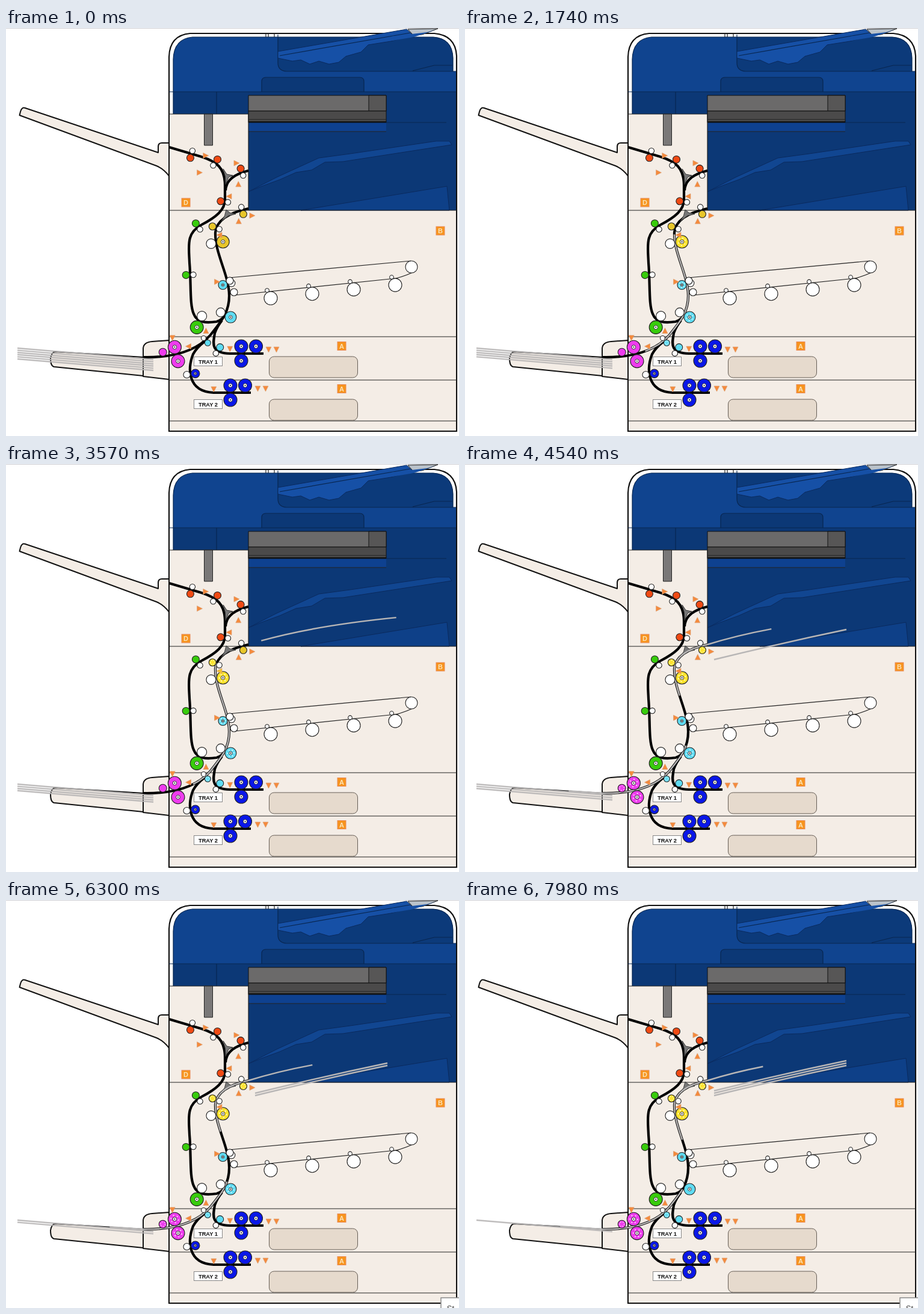
Recreate the animation shown at these times as an HTML page. Size 753 px wide and 678 px high, loop 8000 ms.

```html
<!DOCTYPE html>
<html lang="en">
<head>
<meta charset="utf-8">
<title>Paper path</title>
<style>
html, body { margin: 0; width: 100%; height: 100%; overflow: hidden; background: #fff; }
svg { display: block; width: 753px; height: 678px; }
text { font-family: "Liberation Sans", Arial, sans-serif; font-weight: bold; text-anchor: middle; }
.body { fill: #f4ede6; stroke: #111; stroke-width: 2; stroke-linejoin: round; }
.line { fill: none; stroke: #222; stroke-width: 1.2; }
.seam { fill: none; stroke: #082650; stroke-width: 1.2; }
.track { fill: none; stroke: #000; stroke-width: 4.2; }
.gate { fill: #777; stroke: #333; }
.handle { fill: #e6dacd; stroke: #665e56; }
.sheet { fill: none; stroke: #b8b6b6; stroke-width: 2.4; }
.arrow { fill: #f58a3c; stroke: #d8a27a; stroke-width: .7; }
</style>
</head>
<body>
<svg viewBox="0 0 753 678">
  <path d="M0 .5H753" stroke="#cfcfd4"/>

  <!-- cabinet -->
  <path fill="#fff" stroke="#111" stroke-width="2.2" d="M271 670V48Q272 12 306 9H712Q747 12 749 46V670Z"/>
  <path fill="#f4ede6" d="M272 143H748V669H272Z"/>
  <path class="line" d="M432 9v6M436 9v6M446 9v6"/>
  <path fill="#10448f" d="M278 143V52Q279 18 310 15H710Q742 17 743 50V72H748V303H403V143Z"/>
  <path fill="#0c3876" d="M278 106H748V303H403V143H278Z"/>
  <path id="hood" fill="#0c3a7a" d="M452 15H710Q742 17 743 50V72H466Q452 71 452 58Z"/>
  <path fill="#0c3876" d="M425 106V89Q425 82 432 82H588Q595 82 595 89V106Z"/>
  <path class="seam" d="M278 143V52Q279 18 310 15H710Q742 17 743 50V72M452 11V58Q452 71 466 72H748M425 106V89Q425 82 432 82H588Q595 82 595 89V106M271 106H748M350 106V143M632 157H732M676 71L712 62H742"/>
  <path fill="#1650a6" stroke="#0a2a5e" d="M452 39L666 2L677 12L640 22L602 28L590 40L565 47L553 57L537 60L520 55L505 60L490 53L476 55L452 50Z"/>
  <path class="seam" d="M455 46L672 8"/>
  <path fill="#bac2ca" stroke="#222" d="M668 2L718 1L692 11L677 12Z"/>
  <path fill="#1650a6" d="M640 14L700 7L715 3L678 15L642 21Z"/>

  <!-- output bay -->
  <path fill="#0e4190" d="M403 157H632V172H403Z"/>
  <path fill="#6b6a6a" stroke="#111" d="M403 112H632V138H403Z"/>
  <path fill="#575656" stroke="#111" d="M603 112H632V138H603Z"/>
  <path fill="#4b4a4a" stroke="#111" d="M403 138H632V157H403Z"/>
  <path stroke="#111" stroke-width="2" d="M403 156H632"/>
  <path stroke="#222" d="M403 152H632M403 172H632"/>
  <path fill="#114691" stroke="#0a2a5e" d="M403 272L450 248L520 216L572 209L715 188H737L741 194L560 222L530 223L508 236L482 240L455 252L425 263Z"/>
  <path fill="#0e4088" stroke="#0a2a5e" d="M490 303L733 263L737 303Z"/>
  <path class="line" d="M271 143H403V303M271 303H749M271 513H749M271 585H749M271 653H749"/>
  <path fill="#7a7878" stroke="#222" d="M329.500 143H343.500V195H329.500Z"/>

  <!-- side trays -->
  <path class="body" d="M271 191H259Q253 191 253 197V207L32 133Q26 131 24 139L22.500 145L250 229Q262 234 271 246Z"/>
  <path class="body" d="M228 547L82 538Q76 538 74 549Q74 562 80 563L228 578Z"/>
  <path class="body" d="M271 519L243 521Q229 522 228 532V579L271 584Z"/>

  <!-- belt -->
  <path class="line" d="M371 415L673 387M380 444L648 416Q665 412 682 403"/>

  <!-- paper tracks -->
  <path id="duplex" class="track" d="M271 198L325 214C350 222 364 232 364 262V285C364 302 350 314 325 327C299 341 304 362 305 390C308 425 305 460 312 475C318 491 335 490 350 488Q361 485 365 474"/>
  <path id="upper" class="track" d="M403 237C380 243 366 252 365 270"/>
  <path id="tray1" class="track" d="M428 541H372C338 540 345 522 347 507Q351 496 359 486"/>
  <path id="tray2" class="track" d="M407 606H345C301 604 302 565 311 542Q317 531 330 521"/>
  <path class="track" d="M228 547C275 548 316 538 340 510C355 490 371 475 371 445C371 410 347 375 348 340C350 318 375 306 403 300"/>
  <path id="route" fill="none" d="M20 533L228 547C275 548 316 538 340 510C355 490 371 475 371 445C371 410 347 375 348 340C350 318 375 306 403 300C480 276 560 264 650 255"/>
  <path class="gate" d="M361 234L367 243L377 245L370 248L365 260Q366 246 361 234Z"/>
  <path class="gate" d="M366 302L372 307L382 309L370 312L358 321Q365 312 366 302Z"/>

  <g id="sheets"></g>
  <g id="parts"></g>
  <g id="tip">
    <rect x="723" y="661" width="40" height="30" fill="#fff" stroke="#8a8a8a" stroke-width="1.5"/>
    <text x="739" y="683" font-size="13" fill="#444" style="font-weight:normal">St</text>
  </g>
</svg>
<script>
const LOOP = 8000, PERIOD = 1760, SPEED = 0.178;
const SHEET = 228, EXIT_TIME = 3580, FALL_TIME = 800, STACK = 6;
const RED = '#f04a14', GREEN = '#38cc0c', YELLOW = '#e8c62a', BRIGHT_YELLOW = '#ffe32c';
const CYAN = '#5fdcf3', MAGENTA = '#ee3cee', BLUE = '#0a17e8', WHITE = '#fff';
const ANGLES = { '>': 0, 'v': 90, '<': 180, '^': -90 };

const $ = id => document.getElementById(id);
const route = $('route'), routeD = route.getAttribute('d'), routeEnd = route.getTotalLength();
const mix = (a, b, p) => a + (b - a) * p;
const parts = [];

// Point next to a track; positive offsets lie to the right of travel
function beside(track, distance, offset) {
  const a = $(track).getPointAtLength(distance), b = $(track).getPointAtLength(distance + 1);
  const length = Math.hypot(b.x - a.x, b.y - a.y);
  return [a.x - (b.y - a.y) / length * offset, a.y + (b.x - a.x) / length * offset];
}

function roller(x, y, r, color = WHITE, at = 0) {
  const ring = at && `<circle class="ring" r="${r * 0.58}" fill="none" stroke="#fff" stroke-width="1.3"
    stroke-dasharray="${r * 0.2} ${r * 0.407}"/>`;
  const hub = r > 7 && color !== WHITE && `<circle r="${r * 0.3}" fill="#fff" stroke="#333"/><circle r="1"/>`;
  parts.push(`<g transform="translate(${x} ${y})" ${at ? `data-at="${at}"` : ''}>
    <circle class="disc" r="${r}" fill="${color}" stroke="#222" stroke-width="1.1"/>${ring || ''}${hub || ''}</g>`);
}

// A driven roller and its smaller idler pinching a track
function nip(track, distance, color, r, side = 1) {
  const idler = Math.min(r * 0.78, 8);
  roller(...beside(track, distance, -side * (idler + 0.5)), idler);
  roller(...beside(track, distance, side * (r + 1)), r, color, track === 'route' ? distance : 0);
}

function arrow(x, y, direction, id = '') {
  parts.push(`<path id="${id}" class="arrow" d="M-4 -4.500L5 0L-4 4.500Z"
    transform="translate(${x} ${y}) rotate(${ANGLES[direction]})"/>`);
}
const sensor = (track, distance, offset, direction, id) =>
  arrow(...beside(track, distance, offset), direction, id);

function label(text, x, y, size, color) {
  parts.push(`<text x="${x}" y="${y}" font-size="${size}" fill="${color}">${text}</text>`);
}
function badge(letter, x, y) {
  parts.push(`<rect x="${x - 7}" y="${y - 7}" width="14" height="14" fill="#f7941d" stroke="#e88a5a"/>`);
  label(letter, x, y + 4, 11, '#fbe3b8');
}

function paperTray(i) {
  const x = 391 - 18 * i, y = 529 + 65 * i, drop = 71 * i;
  for (const [dx, dy] of [[0, 0], [24.5, 0], [0, 24]]) roller(x + dx, y + dy, 11, BLUE);
  for (const dx of [45.5, 58.5]) arrow(x + dx, y + 5, 'v');
  badge('A', 558, 528.5 + drop);
  parts.push(`<rect class="handle" x="437.500" y="${546 + drop}" width="147" height="35" rx="8"/>
    <rect x="312.500" y="${546.5 + drop}" width="47" height="15" fill="#fff" stroke="#888"/>`);
  label(`TRAY ${i + 1}`, 336, 557.5 + drop, 9.3, '#111');
}

function build() {
  nip('duplex', 39, RED, 6);
  nip('duplex', 81, RED, 6, -1);
  nip('duplex', 151, RED, 6);
  nip('upper', 11, RED, 6);
  nip('duplex', 214, GREEN, 6);
  nip('duplex', 299, GREEN, 6);
  nip('duplex', 380, GREEN, 11);
  roller(...beside('route', 242, -7), 6.5, MAGENTA, 242);
  for (const side of [-1, 1]) roller(...beside('route', 264, side * 12), 11, MAGENTA, 264);
  nip('route', 318, CYAN, 5);
  nip('route', 372, CYAN, 9.5);
  nip('route', 424, CYAN, 7.5, -1);
  nip('route', 495, YELLOW, 10.5);
  nip('route', 520, YELLOW, 6, -1);
  nip('route', 574, YELLOW, 6);
  nip('tray1', 77, CYAN, 6);
  nip('tray2', 116, BLUE, 7.2);

  roller(674, 397, 10);
  for (const y of [420, 439]) roller(mix(372, 379, (y - 420) / 19), y, 6);
  for (let i = 0; i < 4; i++) {
    const x = 440 + 69 * i, y = 449 - 7.3 * i;
    roller(x, y, 11);
    roller(x - 6, y - 13, 3.3);
  }

  sensor('duplex', 62, -4, '>');
  sensor('duplex', 62, 26, '>');
  sensor('duplex', 142, -7, '<');
  sensor('upper', 14, 18, '>');
  sensor('upper', 28, -15, '^');
  sensor('route', 264, -28, 'v');
  sensor('route', 288, -6, '<');
  sensor('route', 331, -10, '^');
  sensor('route', 432, -17, '>');
  sensor('route', 508, 7, '<', 'exitSensor');
  sensor('route', 562, 16, '^');
  sensor('route', 587, 13, '>');
  sensor('tray1', 56, 8, 'v');
  sensor('tray2', 62, 6, 'v');

  badge('D', 299, 290);
  badge('B', 722, 337);
  paperTray(0);
  paperTray(1);
  $('parts').innerHTML = parts.join('');
}

function fallenSheet(p, lift) {
  const y = (a, b) => mix(a, b - lift, p);
  return `<path class="sheet" d="M${mix(425, 414, p)} ${y(294, 325)}
    Q${mix(530, 524, p)} ${y(268, 298)} ${mix(650, 634, p)} ${y(255, 275)}"/>`;
}

build();
const driven = [...document.querySelectorAll('[data-at]')].map(el => {
  const disc = el.querySelector('.disc');
  return { at: +el.dataset.at, disc, ring: el.querySelector('.ring'), yellow: disc.getAttribute('fill') === YELLOW };
});

function draw(t) {
  const heads = [];
  let taken = 0, markup = '';
  for (let i = 0; i < STACK; i++) {
    const age = t - i * PERIOD;
    const head = routeEnd - SPEED * (EXIT_TIME - age);
    if (head <= SHEET) break;
    taken++;
    if (age < EXIT_TIME) {
      heads.push(head);
      markup += `<path class="sheet" d="${routeD}" stroke-dasharray="${SHEET} 2000"
        stroke-dashoffset="${SHEET - head}"/>`;
    } else {
      markup += fallenSheet(Math.min(1, (age - EXIT_TIME) / FALL_TIME), i * 4);
    }
  }
  for (let i = 0; i < STACK - taken; i++) {
    const y = 532 + i * 3.6;
    markup += `<path class="sheet" d="M19 ${y}L245 ${y + 19}" stroke-opacity=".9"/>`;
  }
  $('sheets').innerHTML = markup;

  for (const { at, disc, ring, yellow } of driven) {
    const running = heads.some(h => h > at && h - SHEET < at);
    ring.setAttribute('visibility', running ? 'visible' : 'hidden');
    ring.setAttribute('transform', `rotate(${t * 0.6 % 360})`);
    if (yellow) disc.setAttribute('fill', running ? BRIGHT_YELLOW : YELLOW);
  }
  $('exitSensor').style.fill = heads.some(h => h > 520 && h < 675) ? '#f2c12e' : '';
  $('tip').setAttribute('visibility', t >= 5170 ? 'visible' : 'hidden');
}

const start = performance.now();
function tick() {
  draw((performance.now() - start) % LOOP);
  requestAnimationFrame(tick);
}
tick();
</script>
</body>
</html>
```
